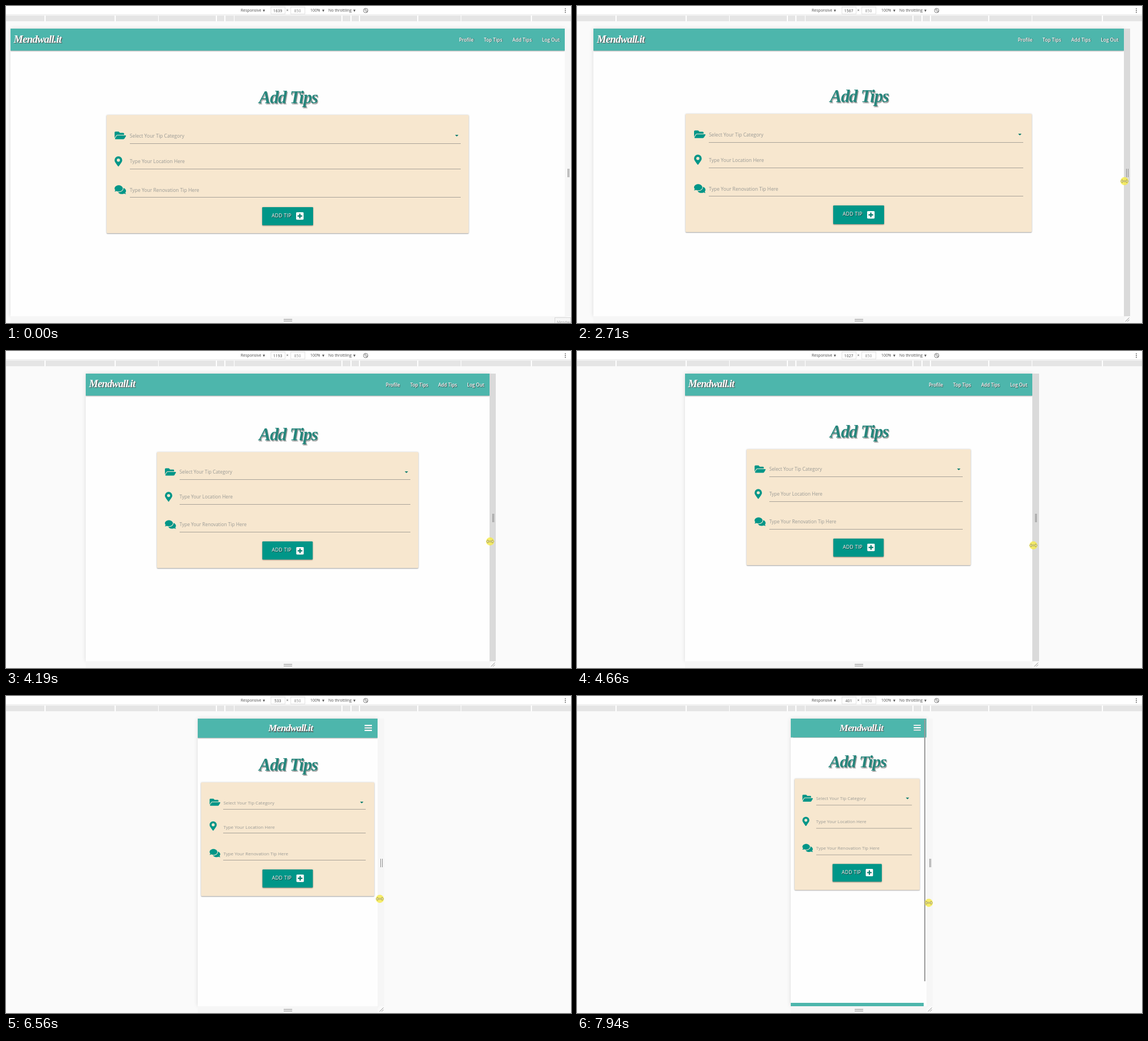
Animation, 999 px wide and 561 px high, one loop 8 s. Source, as an HTML page:

```html
<!DOCTYPE html>
<html lang="en">
<head>
<meta charset="utf-8">
<title>Responsive form</title>
<style>
html, body { margin: 0; width: 100%; height: 100%; overflow: hidden; }
body { position: relative; background: #fafafa; font-family: "Open Sans", "Noto Sans", sans-serif; }
body *, .mid::after { position: absolute; box-sizing: border-box; white-space: nowrap; }
svg * { position: static; }
.mid { transform: translateY(-50%); line-height: 1.3; }

.tools { left: 0; top: 0; width: 999px; height: 16px; background: #fff; border-bottom: 1px solid #e6e6e6; font-size: 6.9px; color: #4a4a4a; }
.tools .mid { top: 8px; }
.tools .drop::after { content: ""; right: -7px; top: 3px; border: solid transparent; border-width: 4px 2.2px 0; border-top-color: #555; }
.tools .num { height: 13px; width: 26px; line-height: 12px; text-align: center; border: 1px solid #e2e2e2; }
.ruler { left: 0; top: 17px; width: 999px; height: 10px; background: #e5e5e5; }
.ruler i { top: 0; width: 1.5px; height: 10px; background: #fff; }

.page { top: 40px; height: 509px; background: #fefefe; overflow: hidden; }
.frame { top: 40px; height: 509px; box-shadow: 0 0 7px rgba(0,0,0,.13); }
.view { left: 0; top: 0; height: 540px; transform-origin: 0 0; }
.head { left: 0; top: 0; background: #4db6ac; color: #fff; box-shadow: 0 1px 1.5px rgba(0,0,0,.25), 0 0 3px rgba(0,0,0,.18); }
.script { font: italic bold 1em/1.2 "Liberation Serif", "Noto Serif", serif; letter-spacing: -.04em; }
.brand { top: 50%; font-size: 2.1em; text-shadow: 1.2px 1.2px 1px #555; }
.center { transform: translate(-50%, -50%); }
.nav { display: flex; gap: 18px; right: 9px; top: 51%; }
.nav span { position: static; font-size: .925em; font-weight: 600; text-shadow: .8px .8px 1px #444; }
.bars { right: 10px; top: 50%; width: 13.5px; height: 11px; margin-top: -5.5px; filter: drop-shadow(.8px .8px .6px #555); }
.title { font-size: 31px; color: #26867c; text-shadow: 1.3px 1.3px 1px #999; }
.card { background: #f7e7cf; border-radius: 1.2px; box-shadow: 0 1.2px 1.5px rgba(0,0,0,.25), 0 0 3px rgba(0,0,0,.2); }
.card svg { overflow: visible; }
.icon { left: 14.4px; height: 2em; width: 2.25em; fill: #009688; }
.label { left: calc(41px - 1.7px * var(--k)); }
.label b { position: static; font-weight: 400; font-size: .957em; color: #9a9a95; }
.line { left: calc(41px - 1.7px * var(--k)); right: 14.4px; height: 1px; background: #a8a298; }
.arrow { right: calc(18.2px + .8px * var(--k)); border: solid transparent; border-width: 3.4px 3.2px 0; border-top-color: #00796b; }
.btn { left: 50%; width: calc(90px - 1px * var(--k)); height: 32.3px; transform: translateX(-50%); background: #009688; color: #fff; border-radius: 1.2px; box-shadow: 0 1.2px 1.5px rgba(0,0,0,.3), 0 0 3px rgba(0,0,0,.2); }
.btn .mid { left: 16.7px; top: 50%; font-size: 8.7px; letter-spacing: .3px; text-shadow: .8px .8px 1px #333; }
.plus { left: 60.5px; top: 9.4px; width: 13.2px; height: 13.2px; filter: drop-shadow(.8px .8px .6px #355); }
.foot { left: 0; top: 503px; height: 6px; background: #4db6ac; }
.thumb { right: 2.4px; top: 1px; width: 2px; height: 464px; background: #999; border-radius: 1px; }

.side { top: 40px; width: 11.5px; height: 509px; }
.side i { top: 248px; width: 1px; height: 15px; background: #8d8d8d; }
.base { top: 549px; height: 12px; }
.grips { left: 490.5px; width: 15.5px; height: 4px; top: 554px; border: solid #8d8d8d; border-width: 1px 0; }
.corner { top: 551px; width: 8px; height: 8px; }
.tip { left: 970px; top: 551px; width: 29px; height: 12px; background: #f6f6f6; border: 1px solid #d8d8d8; font-size: 6.5px; line-height: 15px; padding-left: 3px; color: #aaa; overflow: hidden; }
.cursor { width: 16px; height: 16px; margin: -8px; }
</style>
</head>
<body>
<div class="tools">
  <span class="mid drop" style="left:415px">Responsive</span>
  <span class="mid num" id="num" style="left:467.5px"></span>
  <span class="mid" style="left:495.5px">×</span>
  <span class="mid num" style="left:502.5px;color:#8a8a8a">850</span>
  <span class="mid drop" style="left:538px">100%</span>
  <span class="mid drop" style="left:570px">No throttling</span>
  <svg style="left:631px;top:3px" width="10" height="10" fill="none" stroke="#666" stroke-width=".8"><circle cx="5" cy="5" r="4"/><path d="M3 3.5l2-1 3 4-2 1z"/></svg>
  <svg style="left:987px;top:3px" width="4" height="10" fill="#555"><circle cx="2" cy="1.8" r=".9"/><circle cx="2" cy="5" r=".9"/><circle cx="2" cy="8.2" r=".9"/></svg>
</div>
<div class="ruler" id="ruler"></div>
<div class="frame" id="frame"></div>
<div class="base" id="base"></div>
<div class="grips"></div>
<div class="side" id="side"><i style="left:4.8px"></i><i style="left:7.3px"></i></div>
<svg class="corner" id="corner" stroke="#888" stroke-width=".9"><path d="M.5 7.5l7-7M4 7.5l3.5-3.5"/></svg>

<div class="page" id="page">
  <div class="view" id="view">
    <div class="title script center" id="title">Add Tips</div>
    <div class="card" id="card"></div>
    <div class="head" id="head">
      <div class="brand script mid" id="brand">Mendwall.it</div>
      <div class="nav mid" id="nav"><span>Profile</span><span>Top Tips</span><span>Add Tips</span><span>Log Out</span></div>
      <svg class="bars" id="bars" stroke="#fff" stroke-width="2.1"><path d="M0 1.1h13.5M0 5.5h13.5M0 9.9h13.5"/></svg>
    </div>
  </div>
  <div class="foot" id="foot"></div>
  <div class="thumb" id="thumb"></div>
</div>

<div class="tip" id="tip">Mendwall</div>
<svg class="cursor" id="cursor" viewBox="-8 -8 16 16"><circle r="7.2" fill="#f5ea4a" opacity=".82"/><path id="resize" d="M-6.8 0l3-2.8v1.9h7.6v-1.9l3 2.8-3 2.8v-1.9h-7.6v1.9z" fill="#f6efa0" stroke="#77733c" stroke-width=".6"/></svg>

<script>
const el = id => document.getElementById(id);
const css = (id, props) => Object.assign(el(id).style, props);
const px = v => v + 'px';
const show = on => on ? '' : 'none';

const folder = 'M573 292L500 416A64 64 0 0 1 445 448H45c-19 0-30-20-21-36l73-124A64 64 0 0 1 152 256h400c19 0 30 20 21 36zM152 224h328v-48c0-27-21-48-48-48H272l-64-64H48C21 64 0 85 0 112v278l69-118C86 242 118 224 152 224z';
const pin = 'M172 502C27 291 0 269 0 192a192 192 0 0 1 384 0c0 77-27 99-172 310-10 13-30 13-40 0zM192 272a80 80 0 1 0 0-160 80 80 0 0 0 0 160z';
const chat = 'M416 192c0-88-93-160-208-160S0 104 0 192c0 34 14 66 38 92-13 30-35 54-36 55-5 5-1 13 6 13 37 0 67-12 89-25 32 16 70 25 111 25 115 0 208-72 208-160zm122 220c24-26 38-58 38-92 0-67-54-124-129-148 1 7 1 13 1 20 0 106-108 192-240 192-11 0-21-1-32-2C208 440 282 480 368 480c41 0 79-9 111-25 22 13 52 25 89 25 7 0 11-8 6-13-1-1-23-25-36-55z';

// Vertical offsets shrink by d for each pixel the root font loses.
const topAt = (y, d) => `top:calc(${y}px - ${d}px * var(--k))`;
const row = (icon, text, y, dy, line, dl) =>
  `<svg class="icon mid" viewBox="0 0 576 512" style="${topAt(y - .7, dy + .4)}"><path d="${icon}"/></svg>
   <span class="label mid" style="${topAt(y, dy)}"><b>${text}</b></span>
   <i class="line" style="${topAt(line - .5, dl)}"></i>`;
el('card').innerHTML =
  row(folder, 'Select Your Tip Category', 37, 1, 50.5, 2.8) +
  row(pin, 'Type Your Location Here', 82.5, 3.9, 96, 6) +
  row(chat, 'Type Your Renovation Tip Here', 133, 7, 145.5, 7.9) +
  `<i class="arrow" style="${topAt(35.3, 1.2)}"></i>
   <div class="btn" style="${topAt(162.8, 8.7)}"><span class="mid">ADD TIP</span>
   <svg class="plus" viewBox="0 0 27 27"><rect width="27" height="27" rx="3" fill="#fff"/><path d="M13.5 5v17M5 13.5h17" stroke="#00796b" stroke-width="4.5"/></svg></div>`;
el('ruler').innerHTML = [68, 192, 268.5, 371, 386, 402.5, 593, 609, 624, 727, 803.5, 928]
  .map(x => `<i style="left:${x}px"></i>`).join('');

// Keys are [step, value]; one step lasts STEP ms and step 0 begins the drag.
const STEP = 69.7, START = 2282, SCALE = .598;
const widthKeys = [[-1, 1639], [6, 1567], [11, 1495], [19, 1361], [23, 1288], [34, 1027], [35, 1017],
  [47, 764], [48, 747], [59, 538], [61, 533], [71, 461], [81, 401]];
const offsetKeys = [[-28, -290], [-17, -13], [-9, 1.5], [6, 1.5], [19, 0], [34, 2], [48, -1.5], [61, 3.5], [81, 4.5]];
const heightKeys = [[-28, 556], [-26, 540], [-17, 311], [6, 310], [19, 328], [34, 344], [48, 356], [61, 358.5], [81, 365.5]];

function at(keys, s) {
  if (s <= keys[0][0]) return keys[0][1];
  for (let i = 1; i < keys.length; i++) {
    const [a, u] = keys[i - 1], [b, v] = keys[i];
    if (s <= b) return u + (v - u) * (s - a) / (b - a);
  }
  return keys[keys.length - 1][1];
}

function draw() {
  const t = performance.now() % 8000;
  const s = Math.floor((t - START) / STEP);
  const w = Math.round(at(widthKeys, s));
  const wide = w * SCALE, left = 498 - wide / 2, right = left + wide;
  const rem = w >= 1200 ? 15 : w > 992 ? 14.5 : 14;
  const zoom = Math.min(1, w / 410), tiny = w < 410;
  const desktop = w > 992, bar = w > 600 ? 38.5 : 33.5;

  el('num').textContent = w;
  css('page', { left: px(left), width: px(wide), fontSize: px(rem * SCALE) });
  el('page').style.setProperty('--k', 15 - rem);
  css('frame', { left: px(left), width: px(wide) });
  css('view', { width: px(wide), transform: `scale(${zoom})` });
  css('head', { width: px(wide / zoom), height: px(bar) });
  css('brand', desktop ? { left: '5.5px', transform: '' }
    : { left: 'calc(50% + 5px)', transform: 'translate(-50%, -50%)' });
  css('nav', { display: desktop ? 'flex' : 'none' });
  css('bars', { display: show(!desktop) });

  const titleY = bar + 83.3 - .0315 * (1639 - w);
  const cardW = wide * (w > 600 ? 2 / 3 : 1) - 13;
  css('title', { left: px(wide / 2 + 1), top: px(titleY) });
  css('card', { left: px((wide - cardW) / 2), top: px(titleY + 31), width: px(cardW), height: px(209.5 - 8.5 * (15 - rem)) });
  css('foot', { display: show(tiny), width: px(wide * zoom) });
  css('thumb', { display: show(tiny) });

  const x = right + at(offsetKeys, s), y = at(heightKeys, s);
  const over = x >= 986 || (s >= 0 && s < 41);
  css('side', { left: px(right), background: over ? '#dadada' : '#f6f6f6' });
  css('base', { left: px(left), width: px(wide), background: s >= -28 && y > 549 ? '#dadada' : '#f6f6f6' });
  css('corner', { left: px(right + 2.5) });
  css('tip', { display: show(t < 70) });
  css('cursor', { display: show(s >= -28), left: px(x), top: px(y) });
  css('resize', { display: show(over || s >= 0) });
  requestAnimationFrame(draw);
}
draw();
</script>
</body>
</html>
```
